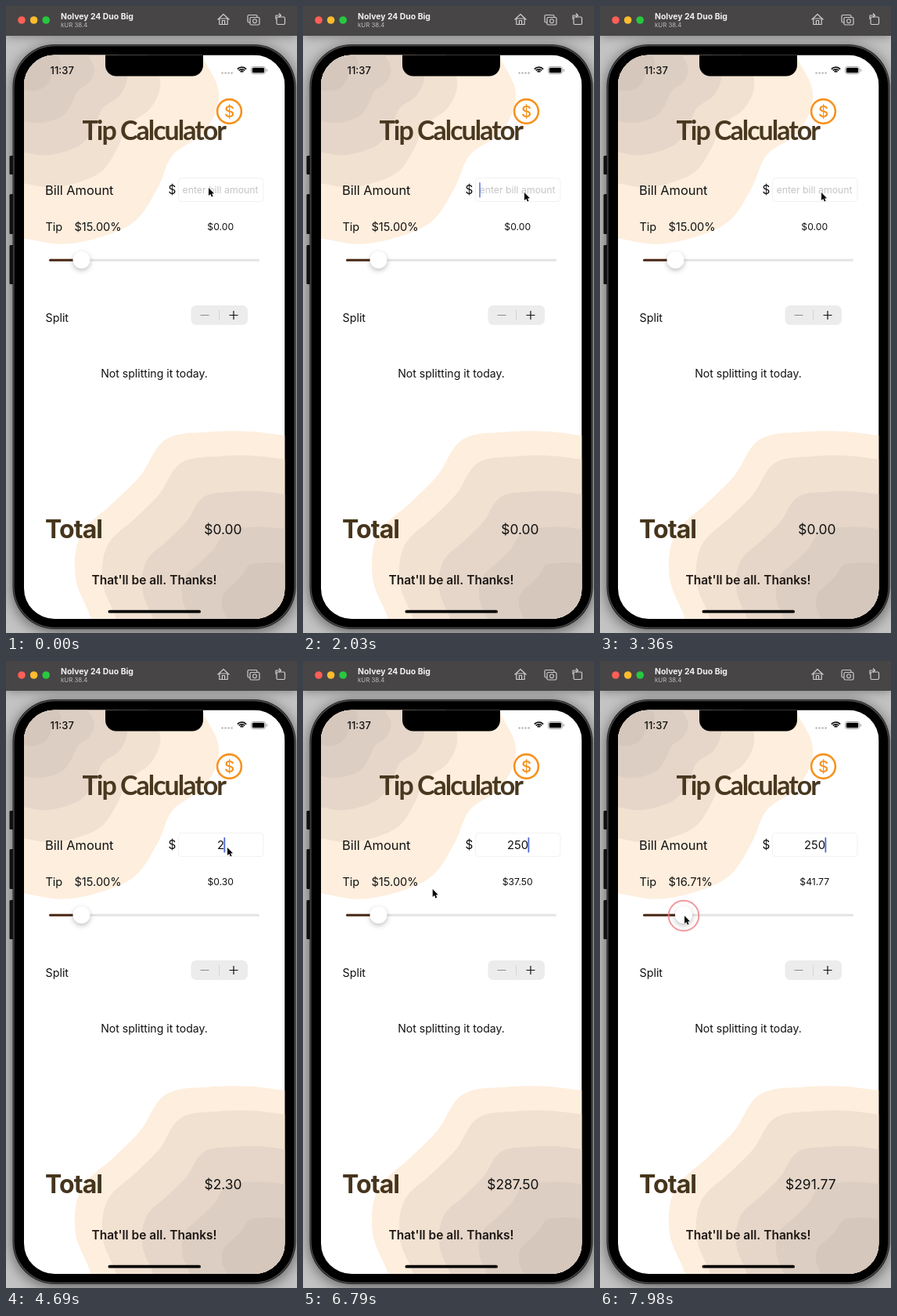
Recreate the animation shown at these times as an HTML page with a canvas. Size 372 px wide and 800 px high, loop 8 s.

```html
<!DOCTYPE html>
<html lang="en">
<head>
<meta charset="utf-8">
<title>Tip Calculator</title>
<style>
  html, body { margin: 0; width: 100%; height: 100%; overflow: hidden; background: #c4c4c4; }
  canvas { display: block; width: 372px; height: 800px; }
</style>
</head>
<body>
<canvas id="stage"></canvas>
<script>
const W = 372, H = 800, LOOP = 8000, STEP = 70;
const canvas = document.getElementById('stage');
const ctx = canvas.getContext('2d');
const dpr = window.devicePixelRatio || 1;
canvas.width = W * dpr;
canvas.height = H * dpr;

const SANS = 'Inter, Roboto, sans-serif';
const INK = '#111';
const SCREEN = { x: 23, y: 62.5, w: 333.5, h: 719.5, r: 39 };
const TONES = ['#feeedd', '#f1e1d1', '#e5d6c9', '#dccec2', '#d5c7bc'];
const KEYS = { first: 4620, gap: 350, text: '250' };
const DRAG = [7740, 7980];

const clamp = v => Math.max(0, Math.min(1, v));
const ramp = (t, a, b) => clamp((t - a) / (b - a));
const ease = p => p * p * (3 - 2 * p);
const mix = (a, b, p) => a + (b - a) * p;
const money = v => '$' + v.toFixed(2);

function box(x, y, w, h, r, fill, stroke, line = 1) {
  ctx.beginPath();
  ctx.roundRect(x, y, w, h, r);
  if (fill) { ctx.fillStyle = fill; ctx.fill(); }
  if (stroke) { ctx.strokeStyle = stroke; ctx.lineWidth = line; ctx.stroke(); }
}

function disc(x, y, r, fill) {
  ctx.beginPath();
  ctx.arc(x, y, r, 0, Math.PI * 2);
  ctx.fillStyle = fill;
  ctx.fill();
}

function ring(x, y, r, color, line, from = 0, to = Math.PI * 2) {
  ctx.beginPath();
  ctx.arc(x, y, r, from, to);
  ctx.strokeStyle = color;
  ctx.lineWidth = line;
  ctx.stroke();
}

function line(color, width, ...points) {
  ctx.beginPath();
  for (const p of points) ctx.lineTo(...p);
  ctx.strokeStyle = color;
  ctx.lineWidth = width;
  ctx.stroke();
}

function label(str, x, y, size, { color = INK, weight = 400, align = 'left', family = SANS, track = 0 } = {}) {
  ctx.font = `${weight} ${size}px ${family}`;
  ctx.letterSpacing = track + 'px';
  ctx.textAlign = align;
  ctx.fillStyle = color;
  ctx.fillText(str, x, y);
}

function shadow(color, blur, y = 0) {
  ctx.shadowColor = color;
  ctx.shadowBlur = blur * dpr;
  ctx.shadowOffsetY = y * dpr;
}

// Smooth curve through evenly spaced values, p from 0 to 1
function spline(values, p) {
  const at = p * (values.length - 1);
  const i = Math.min(Math.floor(at), values.length - 2), u = at - i;
  const b = values[i], c = values[i + 1];
  const a = values[i - 1] ?? b, d = values[i + 2] ?? c;
  return b + u / 2 * (c - a + u * (2 * a - 5 * b + 4 * c - d + u * (3 * (b - c) + d - a)));
}

// Nested waves in a corner: radii are spread over a quarter turn, inner layers shrink evenly
function waves(x, y, dir, radii, second, shrink) {
  TONES.forEach((tone, i) => {
    const scale = i ? second - (i - 1) * shrink : 1;
    ctx.beginPath();
    ctx.moveTo(x, y);
    for (let p = 0; p <= 1; p += 1 / 64) {
      const r = spline(radii, p) * scale * dir, angle = p * Math.PI / 2;
      ctx.lineTo(x + r * Math.cos(angle), y + r * Math.sin(angle));
    }
    ctx.fillStyle = tone;
    ctx.fill();
  });
}

function toolbar() {
  shadow('rgba(0,0,0,.4)', 14);
  box(0, 0, W, 38, 0, '#474546');
  shadow('transparent', 0);
  ['#ff5f57', '#febc2e', '#28c840'].forEach((c, i) => disc(20 + i * 15.6, 18, 4.8, c));
  label('Nolvey 24 Duo Big', 70, 17, 10.4, { color: '#f2f2f2', weight: 700 });
  label('kUR 38.4', 70, 27, 7.9, { color: '#bdbbbc' });

  const c = '#cfcdce';
  line(c, 1.2, [270.5, 17.5], [278, 10.5], [285.5, 17.5]);
  box(272.8, 16, 10.4, 7.5, 0, null, c, 1.2);
  box(276.4, 18.5, 3.2, 5, 0, null, c, 1.2);
  box(309, 11.5, 12, 9.5, 1.5, null, c, 1.2);
  box(312, 14.5, 12, 9.5, 1.5, '#474546', c, 1.2);
  ring(318, 19.2, 2.4, c, 1.1);
  box(346, 14, 10.5, 9.5, 1.5, null, c, 1.2);
  line(c, 1.2, [345, 17], [345, 12], [351, 12]);
  line(c, 1.2, [349, 9.5], [351.5, 12], [349, 14.5]);
}

function phone() {
  for (const [y, h] of [[191, 24], [240, 51], [305, 50]]) box(4.5, y, 6, h, 1.5, '#161616');
  shadow('rgba(0,0,0,.55)', 18, 3);
  box(8.5, 49, 362, 746, 54, '#1c1c1c');
  shadow('transparent', 0);
  box(10, 50.5, 359, 743, 53, '#000', '#4b4b4b', 1.3);
}

function statusBar() {
  box(127, 50, 125, 39.5, 14, '#000');
  label('11:37', 56.5, 87, 13, { weight: 500 });
  for (let i = 0; i < 4; i++) disc(276.6 + i * 4, 85.5, 1.2, '#b9b3ae');
  for (let i = 0; i < 4; i++) ring(301.5, 86, i * 2.6, INK, 1.7, -Math.PI * 0.76, -Math.PI * 0.24);
  box(313.5, 77.5, 18, 9, 2.6, null, '#9a9a9a', 0.9);
  box(314.8, 78.8, 15.4, 6.4, 1.5, '#000');
  box(332.8, 80.3, 1.2, 3.4, 0.6, '#9a9a9a');
}

// Typing holds the caret on; each blink fades out, rests, fades in
function caretAlpha(t) {
  if (t < 630) return 0;
  const resume = 6050;
  if (t >= KEYS.first && t < resume) return 1;
  const p = (t < resume ? t + 190 : t - resume) % 1080;
  return p < 270 ? 1 - p / 270 : ramp(p, 370, 600);
}

function pointer(t) {
  const enter = ease(ramp(t, 70, 420));
  const leave = ease(ramp(t, 6300, 7140));
  const drag = ease(ramp(t, ...DRAG));
  return [
    mix(mix(mix(259, 283, enter), 95, leave), 108, drag),
    mix(mix(mix(232, 238, enter), 323, leave), 325, drag)
  ];
}

function cursor(x, y) {
  ctx.beginPath();
  for (const [dx, dy] of [[0, 0], [0, 10], [2.3, 8], [3.9, 11.6], [5.6, 10.8], [4.1, 7.4], [7, 7.2]]) {
    ctx.lineTo(x + dx, y + dy);
  }
  ctx.closePath();
  ctx.lineJoin = 'round';
  ctx.strokeStyle = 'rgba(255,255,255,.9)';
  ctx.lineWidth = 1.2;
  ctx.stroke();
  ctx.fillStyle = '#0a0a0a';
  ctx.fill();
}

function billField(t, bill) {
  box(220.5, 219.5, 108.5, 30, 4, '#fff', '#f1f1f1');
  label('$', 207.5, 240, 15.3);
  let caretX = 226;
  if (bill) {
    label(bill, 274.5, 240, 14.8, { align: 'center' });
    caretX = 274.8 + ctx.measureText(bill).width / 2;
  } else {
    label('enter bill amount', 225.5, 239, 12.3, { color: '#c5c5c7' });
  }
  ctx.globalAlpha = caretAlpha(t);
  box(caretX - 0.9, 225, 1.8, 19.5, 0.9, '#4668d6');
  ctx.globalAlpha = 1;
}

function slider(pct) {
  const x = 66 + (pct - 10) * 6.1;
  box(55, 322.8, 269, 3, 1.5, '#e4e4e5');
  box(55, 322.8, x - 55, 3, 1.5, '#4a2814');
  shadow('rgba(0,0,0,.25)', 6, 2.5);
  disc(x, 324, 11, '#fff');
  shadow('transparent', 0);
}

function stepper() {
  box(236.5, 382, 72.5, 25, 6.5, '#ececed');
  line('#d3d3d5', 1, [272.5, 388], [272.5, 401]);
  line('#8b8b8d', 1.1, [248.5, 394.5], [259.5, 394.5]);
  line(INK, 1.2, [285.5, 394.5], [296.5, 394.5]);
  line(INK, 1.2, [291, 389], [291, 400]);
}

function app(t) {
  const typed = Math.floor((t - KEYS.first) / KEYS.gap) + 1;
  const bill = KEYS.text.slice(0, Math.max(0, typed));
  const pct = mix(15, 16.708, ease(ramp(t, ...DRAG)));
  const tip = bill * pct / 100;
  const { x, y, w, h, r } = SCREEN;

  ctx.save();
  ctx.beginPath();
  ctx.roundRect(x, y, w, h, r);
  ctx.clip();
  box(x, y, w, h, 0, '#fff');
  waves(x, y, 1, [228, 254, 251, 229, 241, 255, 252, 246, 234], 0.7, 0.17);
  waves(x + w, y + h, -1, [248, 273, 282, 265, 260, 275, 258, 244, 234], 0.87, 0.19);
  statusBar();

  label('Tip Calculator', 97.5, 171, 34, { color: '#493820', weight: 700, family: 'Lato, sans-serif', track: -2 });
  ring(285.5, 134.5, 15.4, '#f6921e', 2.6);
  label('$', 285.5, 142, 20.5, { color: '#f6921e', weight: 500, align: 'center' });

  label('Bill Amount', 50, 241, 16.4);
  billField(t, bill);
  label('Tip', 50.5, 286.5, 14.5);
  label('$' + pct.toFixed(2) + '%', 87.5, 286.5, 14.6);
  label(money(tip), 274.2, 286, 12.2, { align: 'center' });
  slider(pct);
  label('Split', 50.5, 402.5, 14.3);
  stepper();
  label('Not splitting it today.', 189.5, 474, 14.1, { align: 'center' });
  label('Total', 50, 679, 32, { color: '#46351d', weight: 700, track: -0.9 });
  label(money(+bill + tip), 301.5, 673.5, 17.4, { align: 'right' });
  label("That'll be all. Thanks!", 189.5, 738, 15.5, { color: '#1b1512', weight: 600, align: 'center' });
  box(130.5, 770.8, 118.5, 3.8, 1.9, '#000');
  ctx.restore();
}

function draw(t) {
  ctx.setTransform(dpr, 0, 0, dpr, 0, 0);
  box(0, 0, W, H, 0, '#c4c4c4');
  phone();
  toolbar();
  app(t);
  const [x, y] = pointer(t);
  const pressed = (t >= 490 && t < 630) || t >= 7700;
  if (pressed) ring(x - 1, y, 19.3, 'rgba(238,130,137,.82)', 2);
  cursor(x, y);
}

function tick() {
  const t = performance.now() % LOOP;
  draw(Math.floor(t / STEP) * STEP);
  requestAnimationFrame(tick);
}
tick();
</script>
</body>
</html>
```
